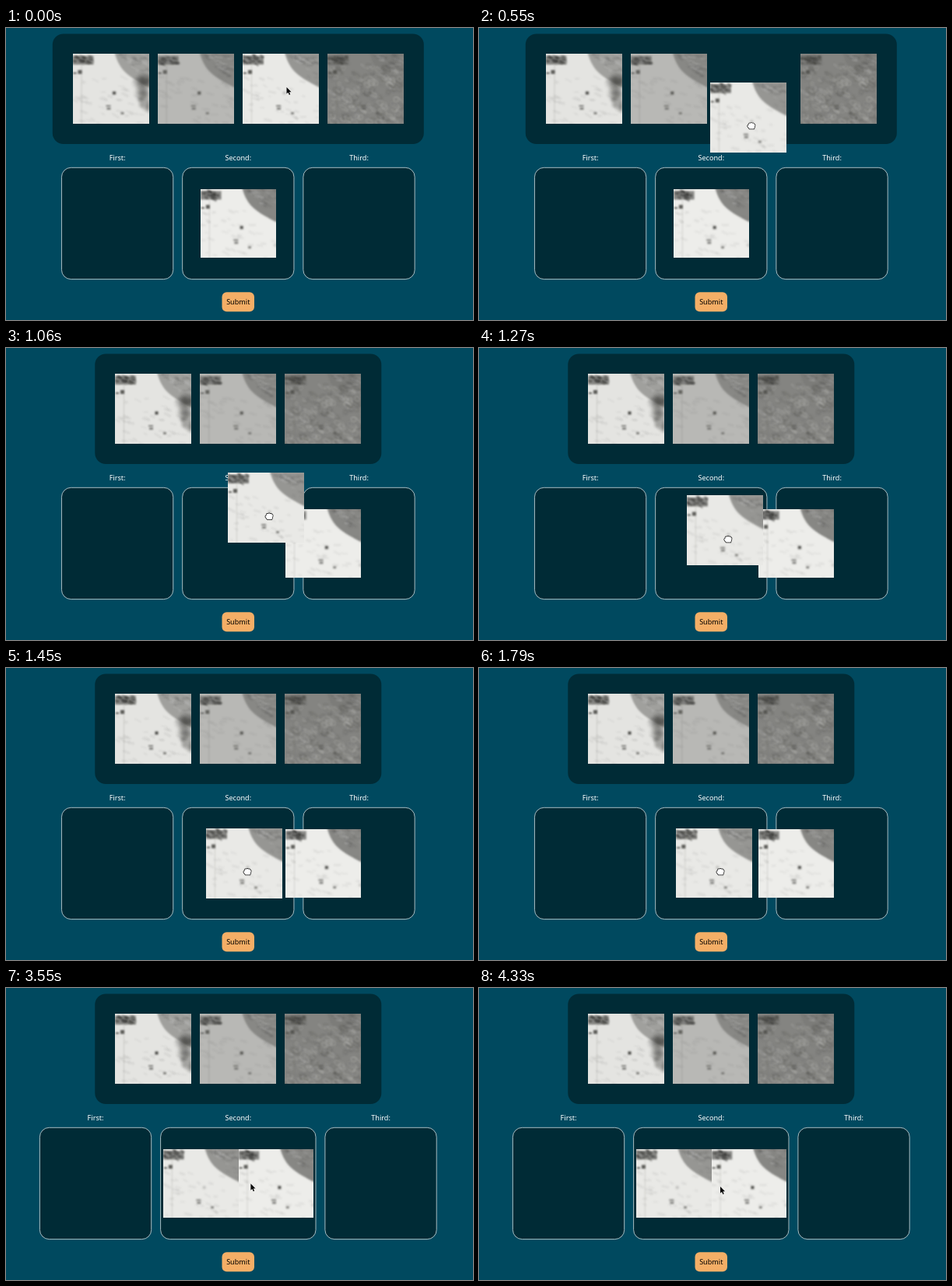
An HTML page with a canvas that plays this animation: 600x375 px, repeating every 5790 ms.

```html
<!DOCTYPE html>
<html lang="en">
<head>
<meta charset="utf-8">
<title>Sorting pictures</title>
<style>
  html, body { margin: 0; width: 600px; height: 375px; overflow: hidden; background: #00495f; }
  canvas { display: block; }
</style>
</head>
<body>
<canvas id="stage" width="600" height="375"></canvas>
<script>
const g = document.getElementById('stage').getContext('2d');
const LOOP = 5790, W = 98, H = 90;
const MID = 298.3, SLOT = 143.3, GAP = 11.9, STEP = 109.2;
const SHIFT = 200, LEAVE = 646, ENTER = 697, RELEASE = 1670, DROP = 2060;

const clamp = v => Math.min(1, Math.max(0, v));
const mix = (a, b, p) => a + (b - a) * p;
const smooth = p => p * p * (3 - 2 * p);

// cubic-bezier(.2, 0, 0, 1)
function ease(p) {
  p = clamp(p);
  let lo = 0, hi = 1;
  for (let i = 0; i < 20; i++) {
    const s = (lo + hi) / 2;
    if (.6 * s * (1 - s) ** 2 + s ** 3 < p) lo = s; else hi = s;
  }
  return 3 * (1 - lo) * lo * lo + lo ** 3;
}

// The screen refreshes in bursts: first moment, last moment, number of steps.
const bursts = [[390, 940, 9], [1060, 1550, 8], [1670, 2120, 7], [3550, 3730, 4], [4060, 4120, 2]];
function snap(t) {
  const burst = bursts.findLast(b => b[0] <= t);
  if (!burst) return 0;
  const [from, to, n] = burst, gap = (to - from) / (n - 1);
  const i = Math.min(n - 1, Math.floor((t - from + 5) / gap));
  return Math.floor((from + i * gap) / 10) * 10;
}

// Dragged picture: time, x, y
const drag = [[390, 304, 33], [730, 282, 145], [940, 288, 160], [1060, 285, 160], [1410, 257, 205.5]];
function dragAt(t) {
  const i = drag.findIndex(k => k[0] > t);
  if (i < 1) return drag.at(i).slice(1);
  const [t0, x0, y0] = drag[i - 1], [t1, x1, y1] = drag[i];
  const p = smooth((t - t0) / (t1 - t0));
  return [mix(x0, x1, p), mix(y0, y1, p)];
}

// A grey aerial view: pale ground, rough corner, dark block and seeded texture.
function aerial({ base, rough, dark = 60, spot = .9, cloud, swirls, seed }) {
  const cv = document.createElement('canvas');
  cv.width = W;
  cv.height = H;
  const c = cv.getContext('2d');
  const rnd = (a = 0, b = 1) => mix(a, b, (seed = seed * 16807 % 2147483647) / 2147483647);
  const grey = (v, alpha = 1) => `rgba(${v},${v},${v - 3},${alpha})`;
  const streak = (x, y, l, w, color) => {
    c.strokeStyle = color;
    c.lineWidth = w;
    c.beginPath();
    c.moveTo(x, y);
    c.lineTo(x + l, y + l * rnd(-.1, .7));
    c.stroke();
  };

  c.fillStyle = grey(base);
  c.fillRect(0, 0, W, H);
  c.filter = 'blur(.8px)';
  c.lineCap = 'round';

  c.fillStyle = grey(rough);
  c.beginPath();
  c.moveTo(54, -2);
  c.bezierCurveTo(60, 22, 72, 30, 100, 44);
  c.lineTo(100, -2);
  c.fill();
  for (let i = 0; i < 36; i++) {
    const x = rnd(60, 96);
    streak(x, (x - 56) * rnd(0, .9), rnd(3, 9), rnd(1, 2), grey(i % 2 ? 215 : 60, .22));
  }
  for (let i = 0; i < 45; i++)
    streak(rnd(0, W), rnd(28, H), rnd(2, 8), rnd(1, 3), grey(100, .1));

  if (swirls) for (let i = 0; i < 130; i++) {
    c.strokeStyle = grey(i % 3 ? 205 : 60, .26);
    c.lineWidth = rnd(.8, 1.8);
    c.beginPath();
    c.ellipse(rnd(0, W), rnd(14, H), rnd(2, 7), rnd(1, 4), .6, rnd(0, 6), rnd(7, 10));
    c.stroke();
  }
  if (cloud) for (let i = 0; i < 16; i++) {
    const y = rnd(30, 82), x = rnd(82, 100), r = rnd(5, 13);
    const s = c.createRadialGradient(x, y, 0, x, y, r);
    s.addColorStop(0, grey(50, .32));
    s.addColorStop(1, grey(50, 0));
    c.fillStyle = s;
    c.fillRect(0, 0, W, H);
  }

  c.fillStyle = grey(dark, .55);
  c.fillRect(0, 3, 27, 11);
  for (let i = 0; i < 26; i++)
    streak(rnd(0, 24), rnd(2, 13), rnd(1, 5), rnd(1, 3), grey(i % 4 ? dark - 20 : 150, .5));
  c.fillStyle = grey(dark, .8);
  c.fillRect(7, 21, 5, 5);
  c.fillRect(1, 24, 4, 2);
  c.fillStyle = grey(dark, spot);
  c.fillRect(51.5, 48.5, 4, 4);
  c.fillStyle = grey(dark, .55);
  c.fillRect(43, 66, 6, 2);
  c.fillRect(44, 69, 5, 3);
  c.fillRect(62, 75, 4, 3);
  c.fillStyle = grey(100, .2);
  c.fillRect(11, 15, 1, H);
  return cv;
}

const cloudy = aerial({ base: 228, rough: 160, cloud: true, seed: 11 });
const dull = aerial({ base: 184, rough: 136, dark: 80, seed: 23 });
const moved = aerial({ base: 233, rough: 150, spot: .2, seed: 37 });
const swirly = aerial({ base: 132, rough: 124, dark: 75, spot: .4, swirls: true, seed: 51 });
const clear = aerial({ base: 237, rough: 135, seed: 67 });

function box(x, y, w, h, r, fill, line) {
  g.beginPath();
  g.roundRect(x, y, w, h, r);
  g.fillStyle = fill;
  g.fill();
  if (line) {
    g.strokeStyle = line;
    g.lineWidth = .8;
    g.stroke();
  }
}

function label(text, x, y, color) {
  g.font = '500 9.1px "Noto Sans", "Open Sans", sans-serif';
  g.textAlign = 'center';
  g.fillStyle = color;
  g.fillText(text, x, y);
}

function icon(path, x, y, scale, fill, line) {
  g.save();
  g.translate(x, y);
  g.scale(scale, scale);
  g.lineWidth = 1.4;
  g.lineJoin = 'round';
  g.strokeStyle = line;
  g.stroke(path);
  g.fillStyle = fill;
  g.fill(path);
  g.restore();
}
const arrowShape = new Path2D('M0 0V10L2.3 8L4 11.7L5.6 11L4 7.3H7.2Z');
const handShape = new Path2D('M-3.5-2Q-2.5-4-1-3Q0-4.5 1.3-3Q3-4 3.6-2.2Q5-2.5 4.7 0L3.5 4H-2.3L-4.6 1Q-5-1-3.5-.5Z');
const arrow = (x, y) => icon(arrowShape, x, y, .85, '#0a0a0a', 'rgba(255,255,255,.35)');
const hand = (x, y) => icon(handShape, x, y, 1, '#fff', '#111');

function drawPanel(t) {
  const left = t >= LEAVE, width = left ? 368 : 477, x = left ? 140 : 85.5;
  box(MID - width / 2, 7.5, width, 141.5, 14, '#002b36');
  g.drawImage(cloudy, x, 33);
  g.drawImage(dull, x + STEP, 33);
  const slide = left ? 1 - ease((t - LEAVE) / SHIFT) : 1;
  g.drawImage(swirly, x + STEP * (2 + slide), 33);
}

function drawSlots(midW) {
  const x = MID - midW / 2;
  const slot = (name, x, w) => {
    box(x, 179.3, w, SLOT, 12, '#002b36', '#d3dde0');
    label(name, x + w / 2, 169.7, '#fff');
  };
  slot('First:', x - GAP - SLOT, SLOT);
  slot('Second:', x, midW);
  slot('Third:', x + midW + GAP, SLOT);
  box(277.5, 339.2, 41.5, 25, 6, '#f4ae66');
  label('Submit', MID, 355.3, '#000');
}

function draw(t) {
  const dropped = t >= DROP;
  g.fillStyle = '#00495f';
  g.fillRect(0, 0, 600, 375);
  drawPanel(t);
  drawSlots(dropped ? 199.4 : SLOT);

  const small = (img, x) => g.drawImage(img, x, 206.5, 96.5, 88.5);
  if (dropped) {
    small(moved, 202);
    small(clear, 298.7);
    const p = clamp((t - 3530) / 590) ** 1.2;
    if (t < 4120) arrow(mix(310, 565, p), mix(255, 34, p));
    else arrow(565, 34);
    return;
  }
  small(clear, 250 + STEP * ease((t - ENTER) / SHIFT));
  const [x, y] = dragAt(t), p = ease((t - RELEASE) / 330);
  g.drawImage(moved, mix(x, 250, p), mix(y, 206.5, p), mix(W, 96.5, p), mix(H, 88.5, p));
  if (t < bursts[0][0]) arrow(360.5, 76); else hand(x + 53, y + 56);
}

const start = performance.now();
function frame() {
  const t = (performance.now() - start) % LOOP;
  // The pointer leaves the stage near the end.
  if (t < 4330) draw(snap(t));
  else {
    g.save();
    g.beginPath();
    g.rect(0, 0, 560, 375);
    g.clip();
    draw(DROP);
    g.restore();
    g.fillStyle = '#00495f';
    g.fillRect(560, 0, 40, 375);
  }
  requestAnimationFrame(frame);
}
frame();
</script>
</body>
</html>
```
